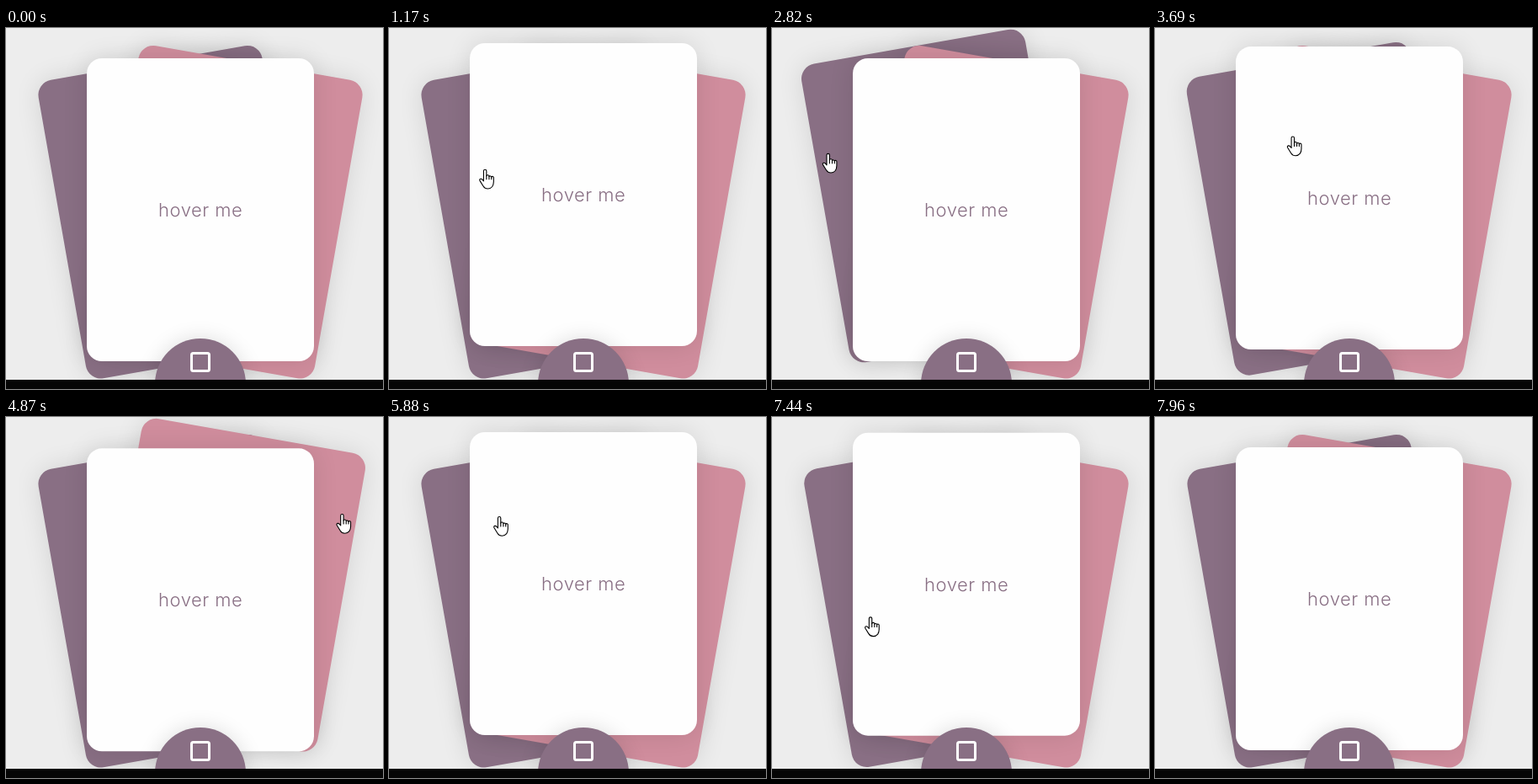
An HTML page for the animation above (9620 ms loop, 448 by 429 pixels).

```html
<!DOCTYPE html>
<html lang="en">
<head>
<meta charset="utf-8">
<title>Hover cards</title>
<style>
  html, body { margin: 0; width: 100%; height: 100%; overflow: hidden; background: #ededed; }
  #stage { position: absolute; left: 0; top: 0; width: 448px; height: 429px; overflow: hidden; }
  .card {
    position: absolute; left: 96px; top: 36px; width: 270px; height: 360px;
    border-radius: 18px; transform-origin: 50% 100%;
    box-shadow: 0 0 30px rgba(0, 0, 0, .11);
  }
  #purple { background: #896f84; }
  #pink { background: #d08d9d; }
  #white { background: #fefefe; }
  svg { position: absolute; left: 0; top: 0; overflow: visible; }
  text { font: 300 22px Inter, "Open Sans", sans-serif; letter-spacing: .5px; fill: #896f84; }
  #badge {
    position: absolute; left: 177px; top: 369px; width: 108px; height: 108px;
    border-radius: 50%; background: #896f84; box-shadow: 0 0 25px rgba(0, 0, 0, .13);
  }
  #badge i {
    position: absolute; left: 42px; top: 16px; width: 18px; height: 18px;
    border: 3px solid #fff; border-radius: 3.5px;
  }
  #bar { position: absolute; left: 0; top: 418px; width: 448px; height: 11px; background: #050505; }
  #cursor path { fill: #fff; stroke: #000; stroke-width: 1.1; stroke-linejoin: round; stroke-linecap: round; }
</style>
</head>
<body>
<div id="stage">
  <div class="card" id="purple"></div>
  <div class="card" id="pink"></div>
  <div class="card" id="white">
    <svg width="270" height="360"><text x="135.2" y="188" text-anchor="middle">hover me</text></svg>
  </div>
  <div id="badge"><i></i></div>
  <div id="bar"></div>
  <svg id="cursor" width="20" height="26">
    <path id="arrow" d="M.5.5V16.5L4.2 13L6.8 18.8L9.3 17.7L6.8 12H11.8Z"/>
    <g id="hand" transform="translate(-6.5 0)">
      <path d="M5.2 14V2.2a1.7 1.7 0 0 1 3.4 0V8a1.6 1.6 0 0 1 3.1.6a1.6 1.6 0 0 1 2.8.8a1.4 1.4 0 0 1 2.6 1V15q0 3-1.6 5.7-2 2.5-5.3 2.5-3.6 0-5.4-3L.8 13.8q-.9-2 .8-2.4 1.3-.1 2.4 1.2z"/>
      <path d="M8.6 8v4M11.7 8.8v3.2M14.5 9.6v2.4"/>
    </g>
  </svg>
</div>
<script>
const LOOP = 9620, LIFT = 18, DUR = 300;
const $ = id => document.getElementById(id);
const tilt = { purple: -10, pink: 10, white: 0 };

// Card under the pointer from each moment on
const hovers = [
  [560, "pink"], [625, "white"], [1255, "purple"], [1850, ""],
  [2620, "purple"], [3627, "white"], [4640, "pink"], [5500, "white"],
  [6060, "purple"], [6470, ""], [6940, "purple"], [7340, "white"], [7655, ""]
];

// Pointer path: time, x, y
const path = [
  [390, 405, 404], [500, 396, 325], [620, 362, 270], [850, 255, 200], [1255, 95, 165],
  [1500, 76, 163], [1850, 48, 168], [2040, 12, 171], [2220, 6, 171], [2430, 6, 171],
  [2620, 53, 158], [3030, 72, 144], [3480, 72, 144], [3627, 98, 137], [3690, 163, 128.5],
  [3930, 215, 126], [4200, 215, 126], [4640, 367, 117], [4870, 399, 115], [5200, 398, 118],
  [5500, 365, 122], [5880, 131, 118], [6060, 95, 127], [6470, 47, 145], [6660, 13, 152],
  [6820, 20, 150], [6950, 68.5, 143], [7170, 78, 150], [7340, 97, 190], [7655, 166, 382],
  [7720, 176, 432]
];

function bezier(x1, y1, x2, y2) {
  const at = (a, b, s) => 3 * a * s * (1 - s) ** 2 + 3 * b * s * s * (1 - s) + s ** 3;
  return x => {
    if (x <= 0) return 0;
    if (x >= 1) return 1;
    let lo = 0, hi = 1;
    for (let i = 0; i < 24; i++) {
      const mid = (lo + hi) / 2;
      if (at(x1, x2, mid) < x) lo = mid; else hi = mid;
    }
    return at(y1, y2, lo);
  };
}
const back = bezier(.175, .885, .32, 1.275);

// Interruptible transition, replayed up to time t
function liftOf(card, t) {
  let run = { start: 0, from: 0, to: 0, dur: 1 };
  const value = when => run.from + (run.to - run.from) * back((when - run.start) / run.dur);
  for (const [start, over] of hovers) {
    if (start > t) break;
    const to = over === card ? 1 : 0;
    if (to === run.to) continue;
    const from = value(start);
    run = { start, from, to, dur: DUR * Math.min(1, Math.abs(to - from)) };
  }
  return LIFT * value(t);
}

function slope(i, k) {
  const a = path[i - 1], b = path[i], c = path[i + 1];
  if (!a || !c || a[k] === b[k] || b[k] === c[k]) return 0;
  if ((b[k] - a[k]) * (c[k] - b[k]) < 0) return 0;
  const before = (b[k] - a[k]) / (b[0] - a[0]), after = (c[k] - b[k]) / (c[0] - b[0]);
  return 2 * before * after / (before + after);
}

function pointer(t) {
  const i = path.findIndex((p, n) => n < path.length - 1 && t < path[n + 1][0]);
  if (i < 0 || t < path[0][0]) return null;
  const a = path[i], b = path[i + 1], span = b[0] - a[0], u = (t - a[0]) / span;
  return [1, 2].map(k =>
    a[k] + (b[k] - a[k]) * u * u * (3 - 2 * u) +
    span * u * (1 - u) * (slope(i, k) * (1 - u) - slope(i + 1, k) * u));
}

function draw(t) {
  for (const card in tilt)
    $(card).style.transform = `rotate(${tilt[card]}deg) translateY(${-liftOf(card, t)}px)`;
  const pos = pointer(t);
  $("cursor").style.display = pos ? "block" : "none";
  if (!pos) return;
  $("cursor").style.transform = `translate(${pos[0]}px, ${pos[1]}px)`;
  const over = hovers.filter(h => h[0] <= t).pop();
  const onCard = over && over[1];
  $("hand").style.display = onCard ? "inline" : "none";
  $("arrow").style.display = onCard ? "none" : "inline";
}

const begin = performance.now();
function tick() {
  draw((performance.now() - begin) % LOOP);
  requestAnimationFrame(tick);
}
tick();
</script>
</body>
</html>
```
